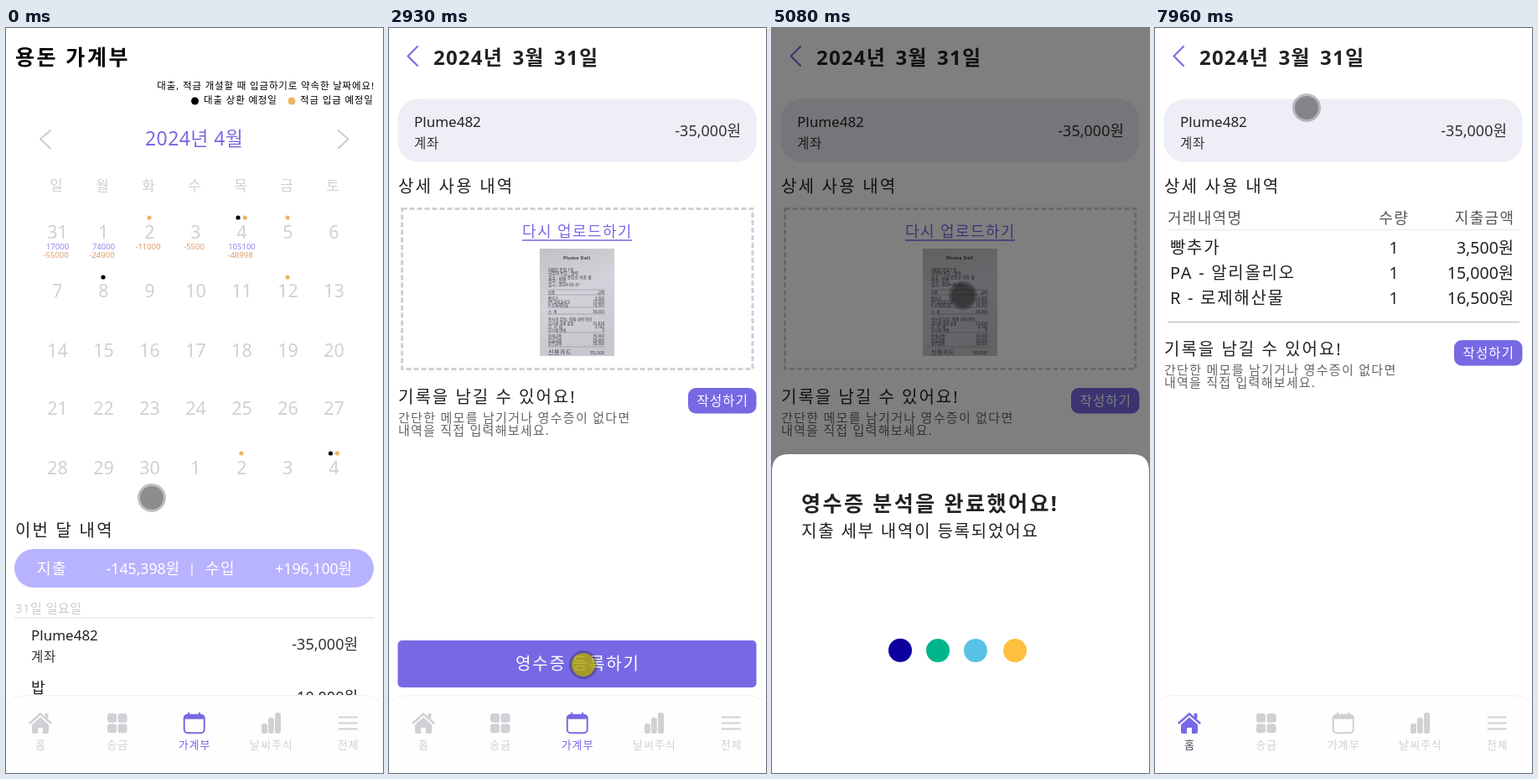
These frames come from a looping animation (450x888 px, 8000 ms). An HTML page:

```html
<!DOCTYPE html>
<html lang="ko">
<head>
<meta charset="utf-8">
<title>용돈 가계부</title>
<style>
html, body { margin: 0; width: 100%; height: 100%; overflow: hidden; background: #fff; }
svg { display: block; width: 100%; height: 100%; }
text { font-family: "Noto Sans", "Noto Sans CJK KR", "Noto Sans CJK JP", sans-serif; white-space: pre; }
</style>
</head>
<body>
<svg id="stage" viewBox="0 0 450 888"></svg>
<script>
const LOOP = 8000;
const PURPLE = '#7769e4', LILAC = '#b8b3ff', GREY = '#d0d0d5', INK = '#222', GOLD = '#ebb662';
const BLUE = '#8d86f0', ORANGE = '#dd9c70';
const SHOP = 'Plume482';

// ---- drawing helpers
const text = (x, y, str, size, { fill = INK, ls = 0, gap = 0, bold = false, at = 'start' } = {}) => {
  // trailing letter spacing shifts aligned text
  const dx = at === 'end' ? ls : at === 'middle' ? ls / 2 : 0;
  return `<text x="${x + dx}" y="${y}" font-size="${size}" fill="${fill}" letter-spacing="${ls}"` +
    ` word-spacing="${gap}" text-anchor="${at}"${bold ? ' font-weight="700"' : ''}>${str}</text>`;
};
const rect = (x, y, w, h, r, fill, more = '') =>
  `<rect x="${x}" y="${y}" width="${w}" height="${h}" rx="${r}" fill="${fill}" ${more}/>`;
const dot = (x, y, r, fill) => `<circle cx="${x}" cy="${y}" r="${r}" fill="${fill}"/>`;
const path = (d, stroke, w = 2) =>
  `<path d="${d}" fill="none" stroke="${stroke}" stroke-width="${w}" stroke-linecap="round" stroke-linejoin="round"/>`;
const line = (x1, x2, y, stroke, w = 1) => `<path d="M${x1} ${y}H${x2}" stroke="${stroke}" stroke-width="${w}"/>`;
const group = (id, body) => `<g id="${id}">${body}</g>`;
const button = (x, y, w, h, r, fill, label, size, ls, base) =>
  rect(x, y, w, h, r, fill) + text(x + w / 2, base, label, size, { fill: '#fff', ls, at: 'middle' });

// ---- calendar page
function calendar() {
  const colX = i => 61.5 + 55 * i;
  const rowY = [251, 321, 392, 461, 532];
  const small = { fill: '#000', ls: .85 };
  let s = text(11, 44, '용돈 가계부', 25, { fill: '#000', ls: 2.6, bold: true });
  s += text(439, 73, '대출, 적금 개설할 때 입금하기로 약속한 날짜에요!', 11.5, { ...small, at: 'end' });
  s += dot(225.5, 87, 4.5, '#000') + text(236, 90, '대출 상환 예정일', 11.5, small);
  s += dot(341, 87, 4.5, GOLD) + text(351, 90, '적금 입금 예정일', 11.5, small);
  s += path('M53 122L41 132.5L53 143.5', '#ccc') + path('M396.5 122L408.5 132.5L396.5 143.5', '#ccc');
  s += text(224.5, 140, '2024년 4월', 23, { fill: PURPLE, ls: .4, at: 'middle' });
  [...'일월화수목금토'].forEach((d, i) => s += text(60 + 55 * i, 194, d, 17, { fill: GREY, at: 'middle' }));
  for (let n = 0; n < 35; n++) {
    const day = n === 0 ? 31 : n > 30 ? n - 30 : n;
    s += text(colX(n % 7), rowY[n / 7 | 0], day, 21.5, { fill: GREY, at: 'middle' });
  }
  const sums = [['17000', '-55000'], ['74000', '-24900'], ['', '-11000'], ['', '-5500'], ['105100', '-48998']];
  sums.forEach(([inc, out], i) => {
    if (inc) s += text(colX(i), 264, inc, 9.5, { fill: BLUE, at: 'middle' });
    s += text(colX(i) - 2, inc ? 274 : 264, out, 9.5, { fill: ORANGE, at: 'middle' });
  });
  const gold = [[171, 226], [285.3, 226], [336, 226], [336, 297], [281, 507], [395.3, 507]];
  const black = [[277, 226], [116, 297], [387.5, 507]];
  gold.forEach(([x, y]) => s += dot(x, y, 2.6, GOLD));
  black.forEach(([x, y]) => s += dot(x, y, 2.6, '#000'));

  s += text(11, 606, '이번 달 내역', 20, { ls: 2.2 }) + rect(10, 621, 429, 46, 23, LILAC);
  const white = { fill: '#fff' };
  s += text(37, 651, '지출', 18, { ...white, ls: 1.5 }) + text(207, 651, '-145,398원', 17.7, { ...white, at: 'end' });
  s += text(222, 650, '|', 17, { ...white, at: 'middle' });
  s += text(238, 651, '수입', 18, { ...white, ls: 1.5 }) + text(413, 651, '+196,100원', 17.7, { ...white, at: 'end' });
  s += text(11, 697, '31일 일요일', 15, { fill: '#ccc', ls: .45 }) + line(10, 439, 703, '#eee', 2);
  s += entry(730) + text(30, 793, '밥', 18) + text(420, 804, '-10,000원', 18, { at: 'end' });
  return s;
}

const entry = y => text(30, y, SHOP, 17) + text(30, y + 24.5, '계좌', 15.5, { fill: '#333', ls: .8 }) +
  text(420, y + 11, '-35,000원', 18, { fill: '#333', at: 'end' });

// ---- detail page parts
const header = () =>
  path('M34 22L22.5 33.5L34 45', PURPLE, 2) +
  text(53, 44, '2024년 3월 31일', 24, { ls: 1.2, gap: 4, bold: true }) +
  rect(10.5, 84.5, 428, 75.5, 25, '#eeeef6') + entry(118) +
  text(11, 196, '상세 사용 내역', 20, { ls: 2.2 });

const memo = () =>
  text(11, 447, '기록을 남길 수 있어요!', 20, { ls: 2 }) +
  text(11, 470, '간단한 메모를 남기거나 영수증이 없다면', 15, { fill: '#666', ls: 1.3 }) +
  text(11, 485, '내역을 직접 입력해보세요.', 15, { fill: '#666', ls: 1.25 }) +
  button(357, 429, 81.5, 30.5, 9, PURPLE, '작성하기', 15.5, 1.2, 450);

const dashedBox = () => rect(15.5, 215.5, 418.5, 191, 0, 'none', `stroke="${GREY}" stroke-width="3" stroke-dasharray="6 3"`);

const camera = () =>
  `<path d="M211 280H215L218 276Q219 275 221 275H229Q231 275 232 276L235 280H238Q243 280 243 285V300Q243 305 238 305H212Q207 305 207 300V285Q207 280 211 280Z" fill="${PURPLE}"/>` +
  `<circle cx="224.5" cy="291" r="8" fill="none" stroke="#fff" stroke-width="2.4"/>` + dot(236, 286.5, 1.2, '#fff') +
  text(225, 345, '영수증 사진 업로드하기', 18, { fill: PURPLE, ls: 1.36, at: 'middle' });

function receipt() {
  const ink = { fill: '#3a3a42' };
  let s = text(159, 249, '다시 업로드하기', 18, { fill: PURPLE, ls: 1.4 }) + line(159, 290, 253, PURPLE, 1.5);
  s += rect(180, 263, 89, 128, 0, 'url(#paper)');
  s += text(224, 276, 'Plume Deli', 5.5, { ...ink, ls: .3, at: 'middle', bold: true });
  ['[매장] 본점 1층', '사업자 번호 : 생략', '주소 : 시내 중앙로 이층 옆', '전화 : 없음', '일시 : 2024-03-31'].forEach((str, i) =>
    s += text(190, 290 + i * 4.4, str, 4.8, ink));
  [312, 318, 333, 341, 363, 380].forEach(y => s += line(189, 258, y, '#8a8a90', .6));
  const rows = [[316.5, '상품', '금액'], [324, '빵추가', '3,500'], [328, 'PA 알리올리오', '15,000'], [332, 'R 로제해산물', '16,500'],
    [339.5, '소  계', '35,000'], [354, '부가세 과세 물품', '31,818'], [358, '부  가  세', '3,182'], [362, '부가세 면세', '0'],
    [369, '합계금액', '35,000'], [373.5, '받을금액', '35,000'], [378, '받은금액', '35,000']];
  rows.forEach(([y, name, sum]) => s += text(190, y, name, 4.4, ink) + text(257, y, sum, 4.4, { ...ink, at: 'end' }));
  s += text(190, 348.5, '봉사료 없음, 결제 내역 확인', 4.6, ink);
  s += text(190, 388.5, '신용카드', 7, { ...ink, ls: .6 }) + text(257, 388.5, '35,000', 5.5, { ...ink, at: 'end' });
  return s;
}

function table() {
  const head = { fill: '#555', ls: 1.3 };
  let s = text(15, 233, '거래내역명', 18, head) + text(284.5, 233, '수량', 18, { ...head, at: 'middle' }) +
    text(428, 233, '지출금액', 18, { ...head, at: 'end' }) + line(15, 435, 240.5, '#e8e8ec');
  [['빵추가', '3,500원'], ['PA - 알리올리오', '15,000원'], ['R - 로제해산물', '16,500원']].forEach(([name, sum], i) => {
    const y = 268.5 + 30.4 * i;
    s += text(18, y, name, 20, { ls: 1.7 }) + text(285, y, '1', 19.5, { at: 'middle' }) + text(428, y, sum, 19.6, { at: 'end' });
  });
  return s + line(15, 435, 350.5, '#b4b2c0');
}

// ---- bottom navigation
function nav(active) {
  const tint = i => i === active ? PURPLE : GREY;
  let s = `<path d="M-1 889V806Q8 795.5 26 795.5H424Q442 795.5 451 806V889Z" fill="#fefefe" stroke="#f1f1f4"/>`;
  let c = tint(0);
  s += path('M28.5 828.5L41 817.5L53.5 828.5', c, 2.4) + rect(46.5, 817, 4, 6, .5, c);
  s += `<path d="M31 830.5L41 821.5L51 830.5V839Q51 841 49 841H44V834H38V841H33Q31 841 31 839Z" fill="${c}"/>`;
  c = tint(1);
  for (const x of [121, 133.5]) for (const y of [817, 829.5]) s += rect(x, y, 11, 10.8, 3, c);
  c = tint(2);
  s += rect(212.7, 818.7, 24, 21.5, 4, 'none', `stroke="${c}" stroke-width="2"`) + rect(212.7, 818.7, 24, 5, 2, c) +
    path('M218 816.5V820M231 816.5V820', c);
  c = tint(3);
  s += rect(305, 829, 7, 12, 2.5, c) + rect(313, 822, 6.8, 19, 2.5, c) + rect(321, 816, 7, 25, 2.5, c);
  s += path('M397.5 821.5H419M397.5 828.5H419M397.5 835.5H419', tint(4), 1.8);
  ['홈', '송금', '가계부', '날씨주식', '전체'].forEach((label, i) => {
    const fill = i === active ? (i ? PURPLE : '#4a4658') : GREY;
    s += text(41 + 91.8 * i, 858.5, label, 13, { fill, ls: 1, at: 'middle' });
  });
  return s;
}

// ---- overlays
const modal = () => rect(18, 176, 413, 173, 10, '#fff') +
  text(45, 224, '영수증을 저장할까요?', 20, { ls: 1.85 }) +
  button(163.5, 283, 114.5, 40.5, 10, PURPLE, '네', 20, 0, 311) +
  button(291, 283, 115, 40.5, 10, LILAC, '아니오', 20, 2, 311);

const sheetTitle = (str, lines) => text(35, 576, str, 25, { ls: 2.45, bold: true }) +
  lines.map((l, i) => text(35, 607 + 30 * i, l, 20, { ls: 1.8 })).join('');

const DOT_X = [153, 198, 243, 290];
const sheet = () =>
  `<path d="M0 900V528Q0 508 20 508H430Q450 508 450 528V900Z" fill="#fff"/>` +
  group('busy', sheetTitle('영수증을 분석하고 있어요!', ['영수증 내용을 바탕으로 지출 세부 내역을', '등록하고 있어요'])) +
  group('done', sheetTitle('영수증 분석을 완료했어요!', ['지출 세부 내역이 등록되었어요'])) +
  group('dots', ['#0d009e', '#00b58c', '#58c1e6', '#ffbf3f'].map((c, i) => dot(DOT_X[i], 742, 14, c)).join(''));

const stage = document.getElementById('stage');
stage.innerHTML =
  `<defs><linearGradient id="paper" x2="0.3" y2="1"><stop stop-color="#c2c1c4"/><stop offset=".5" stop-color="#d2d3da"/><stop offset="1" stop-color="#c8c7ce"/></linearGradient></defs>` +
  rect(0, 0, 450, 888, 0, '#fff') +
  group('list', calendar()) +
  group('detail', rect(0, 0, 450, 888, 0, '#fff') + header() +
    group('upload', dashedBox() + group('empty', camera()) +
      group('filled', receipt() + group('register', button(10.5, 730, 428, 56, 5, PURPLE, '영수증 등록하기', 20, 1.85, 765)))) +
    group('table', table()) + group('memo', memo())) +
  group('navBook', nav(2)) + group('navHome', nav(0)) +
  group('dim', rect(0, 0, 450, 888, 0, '#000', 'opacity=".5"')) +
  group('modal', modal()) + group('sheet', sheet()) +
  group('cursor', dot(0, 0, 17, 'rgba(0,0,0,.25)') + '<circle id="tip" r="14"/>');

const ui = {};
stage.querySelectorAll('[id]').forEach(el => ui[el.id] = el);
const bounce = [...ui.dots.children];
const registerBox = ui.register.querySelector('rect');

// ---- timeline
const UPLOAD = 2200, ASK = 3080, CONFIRM = 4020, SLIDE = 4080, DONE = 5080, RELOAD = 6050;
const PRESSES = [[620, 780], [1740, 1860], [2850, 3010], [3880, 3990]];
const TRACK = [[0, 174, 560], [560, 150, 735], [800, 150, 735], [1600, 378, 369], [1740, 350, 352], [1860, 350, 352],
  [2240, 436, 430], [2780, 232, 759], [3060, 232, 759], [3570, 202, 460], [3840, 228, 319], [5980, 228, 319],
  [6490, 164, 340], [6740, 66, 327], [6930, 82, 257], [7300, 412, 290], [7600, 379, 257], [7960, 181, 95], [8000, 181, 95]];

const clamp = v => Math.max(0, Math.min(1, v));
const ramp = (t, from, dur) => clamp((t - from) / dur);
const smooth = p => p * p * (3 - 2 * p);
const within = (t, a, b) => t >= a && t < b;
const show = (el, on) => el.style.display = on ? '' : 'none';

function cursorAt(t) {
  const i = Math.max(1, TRACK.findIndex(k => k[0] > t));
  const [t0, x0, y0] = TRACK[i - 1], [t1, x1, y1] = TRACK[i];
  const p = smooth(ramp(t, t0, t1 - t0));
  return [x0 + (x1 - x0) * p, y0 + (y1 - y0) * p];
}

function draw(t) {
  const home = t >= RELOAD;
  ui.detail.setAttribute('opacity', ramp(t, 800, 170));
  show(ui.detail, t >= 800);
  show(ui.upload, !home);
  show(ui.empty, t < UPLOAD);
  show(ui.filled, t >= UPLOAD);
  show(ui.table, home);
  ui.memo.setAttribute('transform', `translate(0 ${home ? -57 : 0})`);
  show(ui.navBook, !home);
  show(ui.navHome, home);
  registerBox.setAttribute('fill', t < ASK ? PURPLE : '#5c45c0');

  const fade = ramp(t, ASK, 160);
  show(ui.dim, within(t, ASK, RELOAD));
  ui.dim.setAttribute('opacity', fade);
  show(ui.modal, within(t, ASK, CONFIRM));
  ui.modal.setAttribute('opacity', fade);

  show(ui.sheet, within(t, SLIDE, RELOAD));
  const rise = 1 - (1 - ramp(t, SLIDE, 370)) ** 3;
  ui.sheet.setAttribute('transform', `translate(0 ${380 * (1 - rise)})`);
  show(ui.busy, t < DONE);
  show(ui.done, t >= DONE);
  bounce.forEach((el, i) => {
    const p = ((t - DONE + 7800 - i * 120) % 1300) / 800;
    el.setAttribute('cy', 742 - (p < 1 ? 31 * Math.sin(2 * Math.PI * p) : 0));
  });

  const [x, y] = cursorAt(t);
  const pressed = PRESSES.some(([a, b]) => within(t, a, b));
  ui.cursor.setAttribute('transform', `translate(${x} ${y})`);
  ui.tip.setAttribute('fill', pressed ? 'rgba(190,180,0,.75)' : 'rgba(0,0,0,.26)');
}

const start = performance.now();
function tick() {
  draw((performance.now() - start) % LOOP);
  requestAnimationFrame(tick);
}
tick();
</script>
</body>
</html>
```
